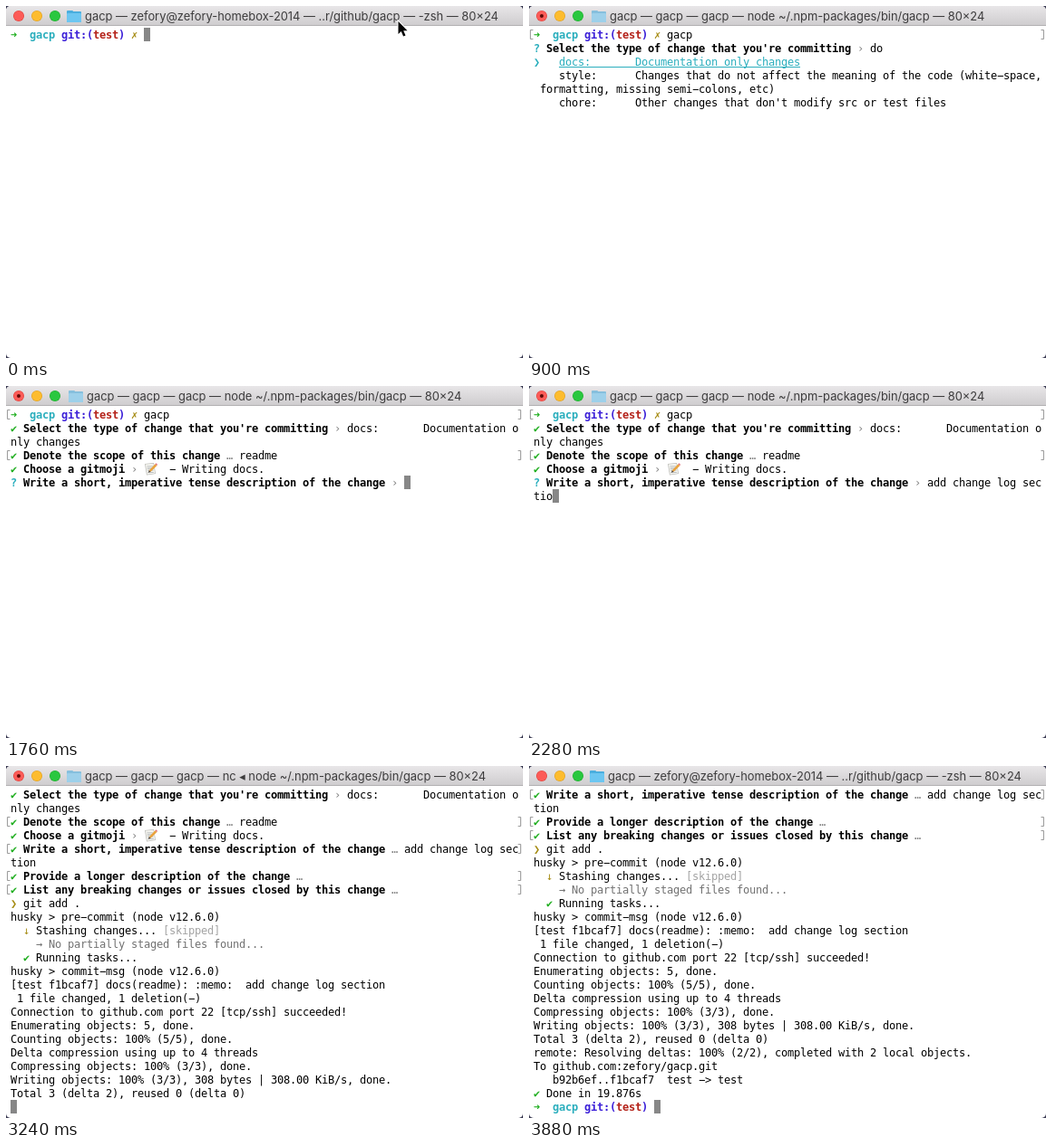
Recreate the animation shown at these times as an HTML page with a canvas. Size 570 by 389 pixels, loop 3.9 s.

```html
<!DOCTYPE html>
<html lang="en">
<head>
<meta charset="utf-8">
<title>Terminal</title>
<style>
html, body { margin: 0; width: 570px; height: 389px; overflow: hidden; background: #fff; }
canvas { display: block; }
</style>
</head>
<body>
<canvas id="stage" width="570" height="389"></canvas>
<script>
const ctx = document.getElementById('stage').getContext('2d');
const LOOP = 3900, TICK = 20;
const COLS = 80, ROWS = 24, CW = 7, LH = 15, LEFT = 5, TOP = 24;
const MONO = '12px "DejaVu Sans Mono", "Noto Sans Mono", monospace';
const COLORS = {
  k: '#000', g: '#1fae1f', c: '#2aaebd', b: '#3b1fd8', r: '#b42118',
  y: '#a68c14', d: '#808080', l: '#a3a3a3', m: '#717171'
};

// Markup: style¦text¦style¦text; styles are a colour letter plus b (bold) or u (underline)
const PROMPT = 'gb¦➜  ¦cb¦gacp ¦bb¦git:(¦rb¦test¦bb¦) ';

const TYPES = [
  ['docs:', 'Documentation only changes'],
  ['feat:', 'A new feature'],
  ['fix:', 'A bug fix'],
  ['style:', 'Changes that do not affect the meaning of the code (white-space, formatting, missing semi-colons, etc)'],
  ['refactor:', 'A code change that neither fixes a bug nor adds a feature'],
  ['perf:', 'A code change that improves performance'],
  ['test:', 'Adding missing tests or correcting existing tests'],
  ['build:', 'Changes that affect the build system or external dependencies (example scopes: gulp, broccoli, npm)'],
  ['ci:', 'Changes to our CI configuration files and scripts (example scopes: runner, deploy, cache)'],
  ['chore:', "Other changes that don't modify src or test files"]
].map(([name, text]) => name.padEnd(12) + text);

const MOJIS = [
  '🎨  - Improving structure / format of the code.',
  '⚡  - Improving performance.',
  '🔥  - Removing code or files.',
  '🐛  - Fixing a bug.',
  '🚑  - Critical hotfix.',
  '✨  - Introducing new features.',
  '📝  - Writing docs.',
  '🚀  - Deploying stuff.',
  '💄  - Updating the UI and style files.',
  '🎉  - Initial commit.',
  '💡  - Documenting source code.',
  '🐳  - Work about Docker.',
  '🏁  - Fixing something on Windows.',
  '⬇  - Downgrading dependencies.'
];

const RUN = '~/.npm-packages/bin/gacp — 80×24';
const SHELL = 'gacp — zefory@zefory-homebox-2014 — ..r/github/gacp — -zsh — 80×24';
const TITLES = [
  { at: 0, x: 87, text: SHELL },
  { at: 460, x: 89, text: 'gacp — gacp — gacp — node ' + RUN, busy: true },
  { at: 2500, x: 87, text: 'gacp — gacp — gacp — node ◂ node ' + RUN, busy: true },
  { at: 2920, x: 87, text: 'gacp — gacp — gacp — nc ◂ node ' + RUN, busy: true },
  { at: 3720, x: 87, text: SHELL }
];

const typed = (text, t, start, step) =>
  text.slice(0, Math.max(0, Math.floor((t - start) / step) + 1));

// All terminal lines present at time t
function session(t) {
  const lines = [];
  let cursor = true;
  const add = (at, text, markAt = Infinity) => {
    if (t >= at) lines.push({ text, mark: t >= markAt });
  };
  const head = (q, done, sep) =>
    `${done ? 'gb¦✔ ' : 'cb¦? '}¦kb¦${q} ¦d¦${sep} ¦k¦`;

  function pick(q, from, end, items, input) {
    if (t < from) return;
    const found = items.filter(s => s.toLowerCase().includes(input)).slice(0, 10);
    if (t >= end) return add(end, head(q, true, '›') + found[0]);
    cursor = false;
    add(from, head(q, false, '›') + input);
    found.forEach((s, i) => add(from, i ? 'k¦    ' + s : `c¦❯   ¦cu¦${s}`));
  }
  function ask(q, from, end, input) {
    add(from, head(q, t >= end, t >= end ? '…' : '›') + input, end);
  }

  add(0, PROMPT + '¦yb¦✗ ¦k¦' + typed('gacp', t, 200, 50), 440);
  if (t < 700) add(440, '');
  pick("Select the type of change that you're committing", 700, 1000, TYPES, typed('doc', t, 860, 30));
  ask('Denote the scope of this change', 1000, 1180, typed('readme', t, 1040, 20));
  pick('Choose a gitmoji', 1180, 1520, MOJIS, typed('do', t, 1240, 40));
  ask('Write a short, imperative tense description of the change', 1520, 2360,
    typed('add change log section', t, 1880, 20));
  ask('Provide a longer description of the change', 2360, 2420, '');
  ask('List any breaking changes or issues closed by this change', 2420, 2480, '');
  add(2480, 'y¦❯ ¦k¦git add .');
  add(2540, 'husky > pre-commit (node v12.6.0)');
  add(2620, 'y¦  ↓ ¦k¦Stashing changes... ¦l¦[skipped]');
  add(2620, 'm¦    → No partially staged files found...');
  add(2640, t < 2720 ? 'y¦  ❯ ¦k¦Running tasks...' : 'g¦  ✔ ¦k¦Running tasks...');
  if (t < 2720) {
    add(2640, 'y¦    ↓ ¦k¦Running tasks for **/*.js ¦l¦[skipped]');
    add(2640, 'm¦      → No staged files match **/*.js');
  }
  add(2760, 'husky > commit-msg (node v12.6.0)');
  add(2860, '[test f1bcaf7] docs(readme): :memo:  add change log section');
  add(2860, ' 1 file changed, 1 deletion(-)');
  add(3000, 'Connection to github.com port 22 [tcp/ssh] succeeded!');
  add(3160, 'Enumerating objects: 5, done.');
  add(3160, 'Counting objects: 100% (5/5), done.');
  add(3180, 'Delta compression using up to 4 threads');
  add(3180, 'Compressing objects: 100% (3/3), done.');
  add(3200, 'Writing objects: 100% (3/3), 308 bytes | 308.00 KiB/s, done.');
  add(3200, 'Total 3 (delta 2), reused 0 (delta 0)');
  add(3280, 'remote: Resolving deltas: 100% (2/2), completed with 2 local objects.');
  add(3600, 'To github.com:zefory/gacp.git');
  add(3600, '   b92b6ef..f1bcaf7  test -> test');
  add(3700, 'g¦✔ ¦k¦Done in 19.876s');
  add(3740, PROMPT);
  if (t < 3740) add(2480, '');
  return { lines, cursor };
}

// Splits lines into rows of cells, wrapping at the last column
function layout(lines) {
  const rows = [];
  const open = mark => {
    const row = { cells: [], end: 0, mark };
    rows.push(row);
    return row;
  };
  for (const { text, mark } of lines) {
    let row = open(mark);
    const parts = text.includes('¦') ? text.split('¦') : ['k', text];
    for (let i = 0; i < parts.length; i += 2) {
      for (const ch of parts[i + 1]) {
        if (row.end >= COLS) row = open(false);
        row.cells.push({ ch, col: row.end, style: parts[i] });
        row.end += EMOJI[ch] && ch !== '⬇' ? 2 : 1;
      }
    }
  }
  if (rows[rows.length - 1].end >= COLS) open(false);
  return rows;
}

function fill(color, draw) {
  ctx.fillStyle = color;
  ctx.beginPath();
  draw();
  ctx.fill();
}
const disc = (color, x, y, r) => fill(color, () => ctx.arc(x, y, r, 0, 7));
const box = (color, x, y, w, h, r = 0) => fill(color, () => ctx.roundRect(x, y, w, h, r));
const poly = (color, ...p) => fill(color, () => {
  for (let i = 0; i < p.length; i += 2) ctx.lineTo(p[i], p[i + 1]);
});
const dot = color => () => disc(color, 7.5, 7.5, 5.5);

// Each is drawn in a 15 by 15 square
const EMOJI = {
  '🎨': dot('#c99a62'), '⚡': dot('#f5b82e'), '🔥': dot('#f0762b'),
  '🐛': dot('#7fae3c'), '🚑': dot('#e3dcdc'), '✨': dot('#f7cf4a'),
  '🚀': dot('#a9b4bd'), '💄': dot('#c8324f'), '🎉': dot('#d9a13c'),
  '📝': () => {
    poly('#b9b9b5', 1, 2, 11, 1, 13, 13, 3, 14.5);
    poly('#f4f4ef', 1.8, 2.6, 10.5, 1.7, 12.3, 12.4, 3.6, 13.7);
    for (let i = 0; i < 4; i++) box('#a9adb0', 3.4 + i * .3, 4.4 + i * 2.2, 6.5, .8);
    poly('#e9a23b', 12.4, 2.2, 14.4, 4, 7.6, 10.8, 5.8, 9.2);
    poly('#4d4034', 5.8, 9.2, 7.6, 10.8, 4.8, 11.8);
    poly('#e0707c', 12.4, 2.2, 13.4, 1.2, 15, 2.8, 14.4, 4);
  },
  '💡': () => {
    disc('#f7e7a0', 7.5, 5.2, 4.2);
    poly('#f7e7a0', 4.6, 7.5, 10.4, 7.5, 9.2, 11, 5.8, 11);
    disc('#fffbe0', 6.8, 4.6, 2);
    box('#8f9498', 5.9, 10.8, 3.2, 3.4, 1);
  },
  '🐳': () => {
    fill('#3f9fc6', () => ctx.ellipse(6.2, 9.4, 5.8, 4.6, 0, 0, 7));
    poly('#3f9fc6', 9, 12.5, 12, 6, 9.8, 3.4, 12.4, 3.6, 14.6, 2.6, 14.2, 6, 13.4, 10, 11, 13);
    fill('#d5ebf2', () => ctx.ellipse(4.8, 12.2, 3.8, 1.6, .2, 0, 7));
    disc('#12303e', 3.4, 9.4, .8);
    box('#74c7e6', 4.6, 1.4, 1.2, 3.4, .5);
    box('#74c7e6', 2.8, 1.2, 4.8, 1.2, .5);
  },
  '🏁': () => {
    box('#e9e9e9', 0, 2, 15, 11);
    for (let i = 0; i < 6; i++)
      for (let j = i % 2; j < 5; j += 2) box('#222', i * 2.5, 2 + j * 2.2, 2.5, 2.2);
  },
  '⬇': () => {
    box('#57788f', .5, .5, 14, 14, 2.5);
    box('#fff', 6, 2.8, 3, 5);
    poly('#fff', 2.8, 7, 12.2, 7, 7.5, 12.4);
  }
};

function drawBar(t) {
  const title = TITLES.filter(s => t >= s.at).pop();
  const grad = ctx.createLinearGradient(0, 0, 0, 21);
  grad.addColorStop(0, '#e8e6e8');
  grad.addColorStop(1, '#cfcdcf');
  ctx.fillStyle = grad;
  ctx.fillRect(0, 0, 570, 21);
  ctx.fillStyle = '#b3b1b3';
  ctx.fillRect(0, 21, 570, 1);

  [['#fc5b57', '#e0443f'], ['#fdbc2e', '#dfa023'], ['#29c73f', '#1dad2b']].forEach(([face, rim], i) => {
    disc(rim, 14 + i * 20, 11, 6);
    disc(face, 14 + i * 20, 11, 5.4);
  });
  if (title.busy) disc('#5f0906', 14, 11, 2);

  const x = title.x - 20;
  const [back, front] = title.busy ? ['#86bfdd', '#9dd0ea'] : ['#4aaede', '#6cc6f1'];
  box(back, x, 5, 7, 4, 1);
  box(back, x, 6, 16, 12, 1);
  box(front, x, 8, 16, 10, 1);

  ctx.font = '12.9px Inter, "DejaVu Sans", sans-serif';
  ctx.fillStyle = '#3d3c3d';
  ctx.fillText(title.text, title.x, 16);
}

function drawMark(y) {
  ctx.strokeStyle = '#9b9b9b';
  ctx.lineWidth = 1;
  ctx.beginPath();
  for (const [x, d] of [[1.5, 3], [567.5, -3]]) {
    ctx.moveTo(x + d, y + 2.5);
    ctx.lineTo(x, y + 2.5);
    ctx.lineTo(x, y + 12.5);
    ctx.lineTo(x + d, y + 12.5);
  }
  ctx.stroke();
}

function drawCell({ ch, col, style }, y) {
  const x = LEFT + col * CW;
  ctx.fillStyle = COLORS[style[0]];
  if (style[1] === 'u') ctx.fillRect(x, y + 13, EMOJI[ch] ? CW * 2 : CW, 1);
  if (EMOJI[ch]) {
    ctx.save();
    ctx.translate(x, y);
    EMOJI[ch]();
    ctx.restore();
  } else if (ch !== ' ') {
    ctx.font = (style[1] === 'b' ? 'bold ' : '') + MONO;
    // the terminal face has a wide hyphen
    ctx.fillText(ch === '-' ? '−' : ch, x, y + 12);
  }
}

function drawPointer(x, y) {
  ctx.save();
  ctx.translate(x, y);
  ctx.beginPath();
  [[0, 0], [0, 14], [3.2, 11], [5.6, 16.4], [8, 15.4], [5.7, 10.2], [10, 10.2]]
    .forEach(p => ctx.lineTo(...p));
  ctx.closePath();
  ctx.strokeStyle = '#fff';
  ctx.lineWidth = 2;
  ctx.stroke();
  ctx.fillStyle = '#000';
  ctx.fill();
  ctx.restore();
}

function draw(t) {
  ctx.fillStyle = '#3a3a52';
  ctx.fillRect(0, 0, 570, 389);
  ctx.save();
  ctx.beginPath();
  ctx.roundRect(0, 0, 570, 389, 5);
  ctx.clip();
  ctx.fillStyle = '#fff';
  ctx.fillRect(0, 0, 570, 389);
  drawBar(t);

  const { lines, cursor } = session(t);
  const rows = layout(lines).slice(-ROWS);
  rows.forEach((row, i) => {
    const y = TOP + i * LH;
    if (row.mark) drawMark(y);
    if (cursor && i === rows.length - 1) {
      ctx.fillStyle = '#878787';
      ctx.fillRect(LEFT + row.end * CW, y, CW, LH);
    }
    row.cells.forEach(cell => drawCell(cell, y));
  });
  if (t < 200) drawPointer(432.5, 17);
  ctx.restore();
}

function loop() {
  const t = performance.now() % LOOP;
  draw(Math.floor(t / TICK) * TICK);
  requestAnimationFrame(loop);
}
loop();
</script>
</body>
</html>
```
